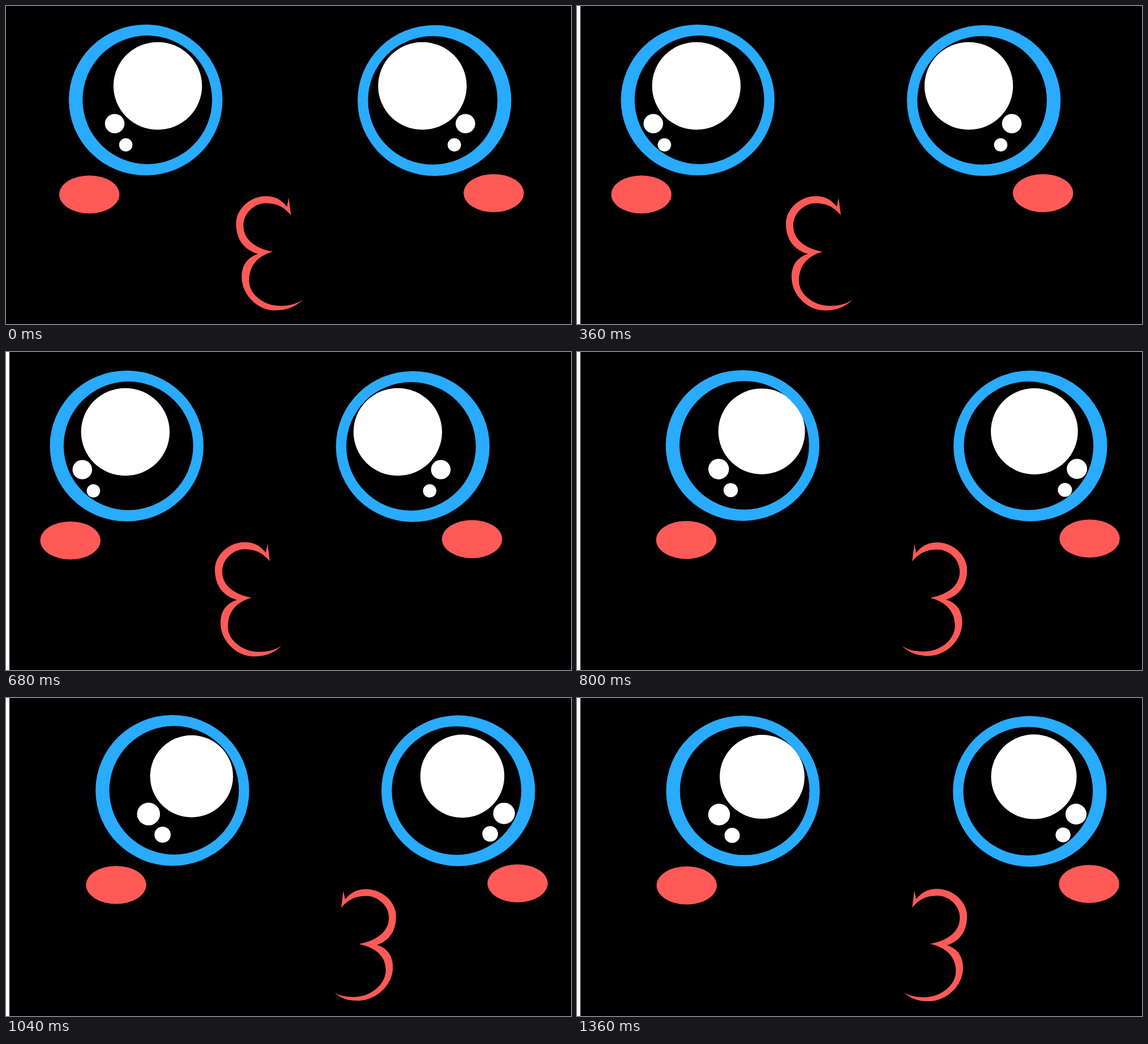
An HTML page for the animation above (1400 ms loop, 998 px wide and 561 px high).

```html
<!DOCTYPE html>
<html lang="en">
<head>
<meta charset="utf-8">
<title>Blowing kisses</title>
<style>
  html, body { margin: 0; width: 100%; height: 100%; overflow: hidden; background: #000; }
  svg { display: block; width: 100vw; height: 100vh; }
</style>
</head>
<body>
<svg viewBox="0 0 998 561">
  <rect width="998" height="561"/>
  <rect id="strip" width="6" height="561" fill="#fff"/>
  <g id="face"></g>
</svg>
<script>
const LOOP = 1400, STEP = 40, TICK = 1000 / 60;
const HALF = 9;            // ticks from rest to full pucker
const SHIFT = 6;           // width of the strip that pushes the face
const BLUE = '#29abff', RED = '#ff5a58', WHITE = '#fff';
const face = document.getElementById('face');
const strip = document.getElementById('strip');

function set(el, attrs) {
  for (const key in attrs) el.setAttribute(key, attrs[key]);
  return el;
}
function add(tag, attrs) {
  const el = document.createElementNS('http://www.w3.org/2000/svg', tag);
  return set(face.appendChild(el), attrs);
}

// --- eyes -------------------------------------------------------------
const oval = (cx, cy, rx, ry) =>
  `M${cx - rx} ${cy}a${rx} ${ry} 0 1 0 ${2 * rx} 0a${rx} ${ry} 0 1 0 ${-2 * rx} 0z`;

function makeEye(side) {
  const glints = [0, 1, 2].map(() => add('ellipse', { fill: WHITE }));
  const ring = add('path', {
    fill: BLUE, 'fill-rule': 'evenodd',
    d: oval(0, 0, 135.7, 133) + oval(-3 * side, -0.3, 114.4, 113.4)
  });
  const cheek = add('ellipse', { fill: RED, rx: 53.2, ry: 33.6 });
  const drop = side < 0 ? 166.7 : 163.4;

  return ([x, y, cheekX, ...spots]) => {
    set(ring, { transform: `translate(${x} ${y})` });
    set(cheek, { cx: cheekX, cy: y + drop });
    glints.forEach((el, i) => {
      const [cx, cy, r] = spots.slice(i * 3, i * 3 + 3);
      set(el, { cx, cy, rx: r, ry: r * 0.988 });
    });
  };
}

const cheekAt = (side, x) => x + (side < 0 ? -99.5 : 104.7);

// At rest the three glints keep one layout, mirrored per side.
const restEye = (side, x, gaze) => [
  x, side < 0 ? 165.8 : 166.7, cheekAt(side, x),
  gaze, 141, 78.2,
  gaze + 76 * side, 207.5, 17.3,
  gaze + 56.4 * side, 245, 11.8
];
const kissEye = (x, y, cheekX, big, small, tiny) => [x, y, cheekX, ...big, ...small, ...tiny];

// --- mouth ------------------------------------------------------------
// Outline points: spike, then one per letter of KINDS.
// h / v: flat or upright extreme, c: cusp, e: pointed end.
const KINDS = 'ehvcvhehvcvhe';
const LEAN = { h: [0.5, 0], v: [0, 0.55], c: [0.6, 0.13], e: [0.25, 0.6] };

function mouthPath(p) {
  const at = i => [p[i * 2 + 2], p[i * 2 + 3]];
  let d = `M${p[0]} ${p[1]}L${at(0)}`;
  for (let i = 1; i < KINDS.length; i++) {
    const a = at(i - 1), b = at(i);
    const out = LEAN[KINDS[i - 1]], into = LEAN[KINDS[i]];
    const c1 = a.map((v, j) => v + out[j] * (b[j] - v));
    const c2 = b.map((v, j) => v - into[j] * (v - a[j]));
    d += `C${c1} ${c2} ${b}`;
  }
  return d + 'Z';
}

const pout = [462, 338, 459, 354, 421, 335.5, 369, 384, 408, 437.5, 379, 478, 437, 537,
  487, 518, 446, 529, 392, 485, 434, 433.5, 382, 387, 421, 348, 466, 369];
const kissLeft = [486, 346.5, 479.5, 359, 435, 331.5, 384, 377, 411, 418.5, 371, 455, 440, 510.5,
  469, 504, 443, 506.5, 383, 459, 437, 422.5, 395, 380, 435, 342, 482, 374];
const kissRight = [596, 343.7, 599, 357.5, 636, 340.6, 689, 386, 665, 431.8, 692.3, 469, 621, 528.3,
  600.4, 524.8, 621, 524.3, 680.5, 470.3, 622, 434.7, 677, 387, 636, 351.5, 592, 372];
const mapX = (list, fn) => list.map((v, i) => i % 2 ? v : fn(v));

// --- poses ------------------------------------------------------------
const rest = (x1, gaze1, x2, gaze2, mouth) =>
  ({ left: restEye(-1, x1, gaze1), right: restEye(1, x2, gaze2), mouth });

const middle = rest(246.7, 268, 756.8, 735.5, mapX(pout, x => x + 37.4));
const leftRest = rest(213.2, 210.8, 718.5, 692, pout);
const rightRest = rest(291.7, 325.4, 801.7, 808.8, mapX(pout, x => 1058 - x));

const leftKiss = {
  left: kissEye(220.3, 157.2, 113.5, [222.7, 124.7, 64.8], [147.3, 190.3, 24.7], [172.2, 236, 16]),
  right: kissEye(709.4, 160.3, 814.2, [683, 134.5, 63], [759.5, 201.5, 25.3], [717.8, 241.7, 21.8]),
  mouth: kissLeft
};
const rightKiss = {
  left: kissEye(298.4, 157.5, 199.2, [332.6, 132.3, 63.3], [256.5, 199, 26.3], [291.7, 233.4, 19.5]),
  right: kissEye(793.1, 157.4, 898.2, [800.6, 131.7, 66.2], [869.6, 195.7, 22.9], [835.2, 229.3, 18]),
  mouth: kissRight
};

function blend(a, b, k) {
  const out = {};
  for (const key in a) out[key] = a[key].map((v, i) => v + (b[key][i] - v) * k);
  return out;
}

// Two linear there-and-back puckers, at rest outside them.
function pucker(tick) {
  if (tick < 0 || tick > HALF * 4) return 0;
  return 1 - Math.abs(tick % (HALF * 2) - HALF) / HALF;
}

function poseAt(tick) {
  if (tick < 3 || (tick > 41 && tick < 44)) return middle;
  return tick < 44
    ? blend(leftRest, leftKiss, pucker(tick - 3))
    : blend(rightRest, rightKiss, pucker(tick - 47));
}

// --- drawing ----------------------------------------------------------
const drawLeft = makeEye(-1), drawRight = makeEye(1);
const mouth = add('path', { fill: RED });

function render(ms) {
  const time = Math.floor(ms % LOOP / STEP) * STEP;
  const tick = Math.floor(time / TICK + 1e-6);
  const pose = poseAt(tick);
  const shift = pose === middle && tick > 0 ? SHIFT : 0;
  set(strip, { visibility: tick > 0 ? 'visible' : 'hidden' });
  set(face, { transform: `translate(${shift} 0)` });
  drawLeft(pose.left);
  drawRight(pose.right);
  set(mouth, { d: mouthPath(pose.mouth) });
}

function loop() {
  render(performance.now());
  requestAnimationFrame(loop);
}
loop();
</script>
</body>
</html>
```
